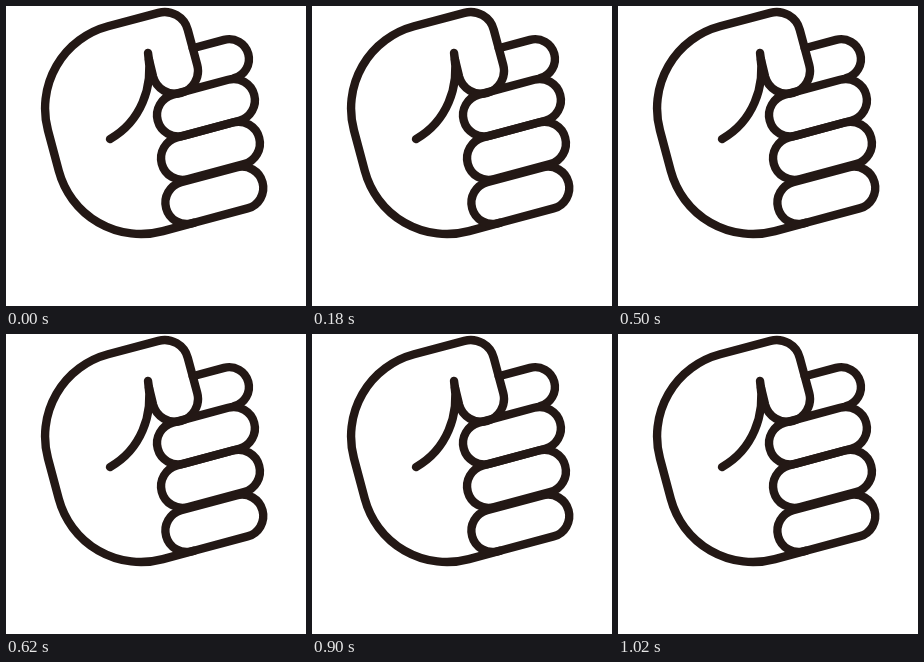
Animation, 300 px wide and 300 px high, one loop 1100 ms. Source, as an HTML page:

```html
<!DOCTYPE html>
<html lang="en">
<head>
<meta charset="utf-8">
<title>Knocking fist</title>
<style>
  html, body { margin: 0; height: 100%; overflow: hidden; background: #fff; }
  svg { display: block; width: 100vw; height: 100vh; }
</style>
</head>
<body>
<svg viewBox="0 0 300 300">
  <g id="fist" fill="none" stroke="#231815" stroke-width="8.4" stroke-linecap="round" stroke-linejoin="round">
    <!-- index finger -->
    <path d="M55.6 -65.6H88a19.8 19.8 0 0 1 0 39.6"/>
    <!-- palm and thumb -->
    <path d="M12 103.3H-20.5a85 85 0 0 1 -85 -85V-23.7a85 85 0 0 1 85 -85H31.6a24 24 0 0 1 24 24V-48.3a22.8 22.8 0 0 1 -45.6 0L10.4 -66"/>
    <!-- crease -->
    <path d="M11.2 -72.6C8 -38 -14 -8 -47.8 .7"/>
    <!-- other fingers -->
    <rect x="3.1" y="-26" width="99.8" height="42.5" rx="21.25"/>
    <rect x="-4.2" y="16.5" width="100.8" height="43.1" rx="21.55"/>
    <rect x="-11.5" y="60.8" width="99.8" height="42.5" rx="21.25"/>
  </g>
</svg>
<script>
  const fist = document.getElementById('fist');
  const UP = 'translate(150 120) rotate(-15)';
  const DOWN = 'translate(147.6 174.8) rotate(15)';

  function draw() {
    const t = performance.now() % 1100;
    const down = t >= 300 && Math.floor((t - 300) / 200) % 2 === 0;
    fist.setAttribute('transform', down ? DOWN : UP);
    requestAnimationFrame(draw);
  }
  draw();
</script>
</body>
</html>
```
